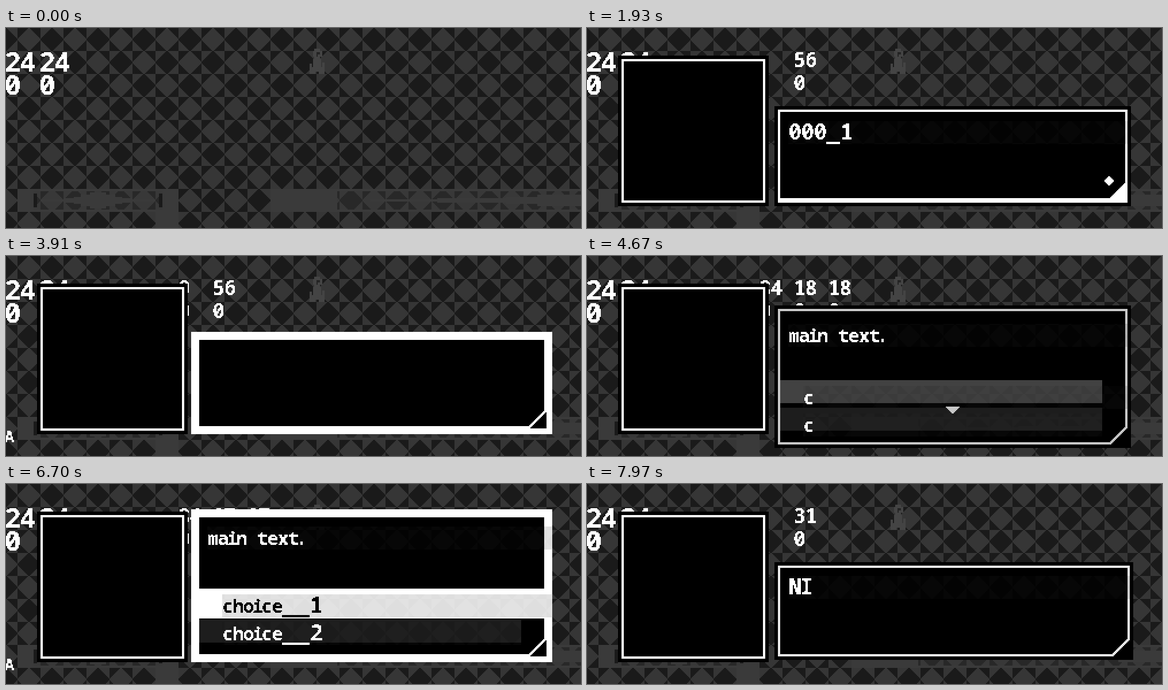
These frames come from a looping animation (1000 px wide and 348 px high, 7990 ms). An HTML page with a canvas:

```html
<!DOCTYPE html>
<html lang="en">
<head>
<meta charset="utf-8">
<title>Message window</title>
<style>
html, body { margin: 0; width: 100%; height: 100%; overflow: hidden; background: #1a1a1a; }
canvas { display: block; width: 1000px; height: 348px; image-rendering: pixelated; }
</style>
</head>
<body>
<canvas id="stage" width="500" height="174"></canvas>
<script>
// Everything is drawn on a half-size grid, shown at twice its size.
const W = 500, H = 174, LOOP = 7990, CHAR_MS = 60;
const ctx = document.getElementById('stage').getContext('2d');

const clamp = v => Math.max(0, Math.min(1, v));
const ramp = (t, from, length) => clamp((t - from) / length);
const easeOut = x => 1 - Math.pow(1 - x, 3);
const gray = v => { const n = Math.round(v * 255); return `rgb(${n},${n},${n})`; };

function layer(w, h) {
  const c = document.createElement('canvas');
  c.width = w;
  c.height = h;
  return c;
}

function rect(g, color, x0, y0, x1, y1) {
  x0 = Math.round(x0); y0 = Math.round(y0);
  g.fillStyle = color;
  g.fillRect(x0, y0, Math.round(x1) - x0, Math.round(y1) - y0);
}

// Diamond made of whole pixel rows
function diamond(g, color, cx, cy, r) {
  for (let y = -r; y < r; y++) {
    const half = y < 0 ? r + y + 1 : r - y;
    rect(g, color, cx - half, cy + y, cx + half, cy + y + 1);
  }
}

function makeBackdrop() {
  const c = layer(W, H), g = c.getContext('2d');
  const light = '#363636', dark = '#1a1a1a', wall = '#3a3a3a';
  for (let j = 0; j < 9; j++) {
    for (let k = 0; k < 26; k++) {
      const odd = (k + j) % 2;
      rect(g, odd ? dark : light, k * 20 - 10, j * 20, k * 20 + 10, j * 20 + 20);
      diamond(g, odd ? light : dark, k * 20, j * 20 + 10, 10);
    }
  }
  // Walls along the floor
  rect(g, wall, 10, 140, 24, 160);
  rect(g, wall, 24, 140, 136, 142);
  rect(g, wall, 24, 158, 136, 160);
  rect(g, wall, 136, 140, 150, 160);
  rect(g, wall, 130, 160, 150, 174);
  rect(g, wall, 230, 140, 288, 160);
  rect(g, wall, 288, 140, 500, 142);
  rect(g, wall, 288, 158, 500, 160);
  g.globalAlpha = .45;
  rect(g, wall, 24, 142, 136, 158);
  rect(g, wall, 288, 142, 500, 158);
  g.globalAlpha = 1;
  rect(g, dark, 24, 144, 27, 156);
  rect(g, dark, 133, 144, 136, 156);
  for (const [half, tall] of [[50, 1], [30, 2], [21, 3], [15, 5], [7, 7]]) {
    rect(g, wall, 80 - half, 150 - tall, 80 + half, 150 + tall);
  }
  for (const [x, tall] of [[317, 1], [375, 2], [435, 3], [462, 5]]) {
    rect(g, wall, x, 150 - tall, 500, 150 + tall);
  }
  // Faint standing figure
  const body = '#444';
  rect(g, body, 268, 18, 273, 27);
  rect(g, body, 267, 20, 275, 25);
  rect(g, body, 267, 27, 274, 38);
  rect(g, body, 264, 31, 266, 40);
  rect(g, body, 266, 34, 269, 40);
  rect(g, body, 272, 34, 275, 40);
  rect(g, body, 275, 30, 277, 40);
  rect(g, '#242424', 270, 21, 273, 23);
  rect(g, '#242424', 270, 23, 271, 25);
  return c;
}
const backdrop = makeBackdrop();

// Text is set glyph by glyph with hard edges.
const glyphs = {};
function glyph(ch, size, color) {
  const key = ch + size + color;
  if (glyphs[key]) return glyphs[key];
  const c = layer(32, 40), g = c.getContext('2d');
  g.font = `600 ${size}px "Noto Sans Mono", "DejaVu Sans Mono", monospace`;
  g.textAlign = 'center';
  g.fillStyle = color;
  g.fillText(ch, 16, 30);
  const img = g.getImageData(0, 0, 32, 40);
  for (let i = 3; i < img.data.length; i += 4) img.data[i] = img.data[i] > 125 ? 255 : 0;
  g.putImageData(img, 0, 0);
  return glyphs[key] = c;
}

const special = { ' ': 9, '.': 5, i: 7, I: 8, _: 12, N: 12 };
const advance = ch => special[ch] || (/[a-z]/.test(ch) ? 9 : 11);
const measure = s => [...s].reduce((sum, ch) => sum + advance(ch), 0);

function write(s, x, y, color = '#fff') {
  for (const ch of s) {
    const w = advance(ch);
    ctx.drawImage(glyph(ch, /[a-z.]/.test(ch) ? 16 : 19, color), Math.round(x + w / 2) - 16, Math.round(y) - 30);
    x += w;
  }
}

function digits(n, x, y, size = 18, step = 10) {
  [...String(n)].forEach((ch, i) =>
    ctx.drawImage(glyph(ch, size, '#fff'), x + i * step + Math.floor(step / 2) - 16, y - 30));
}

const pages = [
  { start: 330, first: 470, slot: 0, text: '000_0', settle: 1050, mark: 1130 },
  { start: 1200, first: 1400, slot: 1, text: '000_1', settle: 1800, mark: 1930 },
  { start: 2010, first: 2210, slot: 0, text: '000_2', settle: 2690, mark: 2820 },
  { start: 2890, first: 3090, slot: 1, text: '000_3', settle: 3540, mark: 3670 },
  { start: 3860, first: 4060, slot: 0, text: 'main text.' },
  { start: 7590, first: 7910, slot: 1, text: 'NICE' }
];
const choices = ['choice__1', 'choice__2'];
const flashes = [1200, 2010, 2890, 3860, 6700];
const presses = [...flashes, 5750];
const CHOOSE = 4618, CHOICE_TEXT = 4660, PICK = 6700, CLOSED = 7100;

const typed = (s, first, t) =>
  t < first ? 0 : Math.min(s.length, 1 + Math.floor((t - first) / CHAR_MS));
const typedWidth = (s, n) => n ? measure(s.slice(0, n + 1)) : 0;

function counter(slot, n) {
  digits(n, 150 + slot * 30, 34);
  digits(0, 150 + slot * 30, 54);
}

function drawCounters(t, index) {
  for (const x of [0, 30]) {
    digits(24, x, 38, 24, 13);
    digits(0, x, 58, 24, 13);
  }
  if (index < 0) return;
  const page = pages[index], prev = pages[index - 1];
  counter(page.slot, typedWidth(page.text, typed(page.text, page.first, t)));
  if (prev && t < page.start + 120) counter(prev.slot, measure(prev.text));
  if (t >= CHOOSE && t < PICK + 80) {
    choices.forEach((s, i) => counter(i + 1, typedWidth(s, typed(s, CHOICE_TEXT, t))));
  }
}

function drawFace(t) {
  const y = Math.round(20 * (1 - easeOut(ramp(t, 330, 200))));
  rect(ctx, '#000', 27, 24 + y, 158, 155 + y);
  rect(ctx, '#fff', 30, 27 + y, 155, 152 + y);
  rect(ctx, '#000', 32, 29 + y, 153, 150 + y);
}

// Text strip: the backdrop shows through a little
function strip(x, y, right) {
  x = Math.round(x); y = Math.round(y);
  const w = Math.round(right) - x;
  ctx.globalAlpha = .14;
  ctx.drawImage(backdrop, x, y, w, 20, x, y, w, 20);
  ctx.globalAlpha = 1;
}

function corner(r, b, color, filled) {
  for (let i = 0; i < 17; i++) {
    const x = r - 1 - i, y = b - 17 + i;
    rect(ctx, filled ? color : '#000', x, y, r, y + 1);
    rect(ctx, color, x, y, Math.min(x + 3, r), y + 1);
  }
}

function drawChoices(t, box, grow, lag, flash) {
  const lit = t >= 6430;
  choices.forEach((s, i) => {
    const y = box.b - 56 + i * 24;
    if (i) rect(ctx, '#1d1d1d', 168, y, 448, y + 20);
    else if (flash) rect(ctx, '#fff', box.l - flash, y - 3, box.r + flash, y + 23);
    else if (lit) rect(ctx, gray(t < 6450 ? .65 : 1), 168, y - 1, 448, y + 21);
    else rect(ctx, gray(.29 * grow), 168, y, 448, y + 20);
    const n = typed(s, CHOICE_TEXT, t), ty = y + 2 + lag * .75;
    if (!n) return;
    strip(188, ty, i ? 448 : box.r + flash);
    write(s.slice(0, n), 188, ty + 16, !i && (lit || flash) ? '#000' : '#fff');
  });
  if (t < 5220) {
    for (let i = 0; i < 6; i++) {
      rect(ctx, '#c8c8c8', 312 + i, box.b - 33 + i, 324 - i, box.b - 32 + i);
    }
  }
  if (t >= 6230 && t < 6430) diamond(ctx, '#fff', 453, Math.round(box.b) - 46, 4);
}

function drawMessage(t, page) {
  if (t >= CLOSED && t < 7590) return;
  const last = page === pages[5], choosing = page === pages[4] && t >= CHOOSE;
  const age = t - (last ? 7590 : 330);
  const [tau, speed] = last ? [75, Math.PI / 380] : [45, 0];

  const grow = choosing ? easeOut(ramp(t, CHOOSE, 100)) : 0;
  const rise = choosing ? easeOut(ramp(t, CHOOSE, 600)) : 0;
  const lag = 5 * (1 - rise) * grow;
  const shut = page === pages[4] ? easeOut(ramp(t, PICK + 200, 200)) : 0;
  const mid = 110.5 - 22 * rise;
  const half = (79 + 44 * grow) / 2 * easeOut(ramp(age, 0, 140)) * (1 - shut);
  if (half < 2) return;

  const box = {
    l: 166,
    r: Math.round(470 - 304 * Math.exp(-age / tau) * Math.cos(speed * age)),
    t: Math.round(mid - half),
    b: Math.round(mid + half)
  };
  if (box.r < box.l + 20) box.r = box.l + 20;

  const hit = flashes.find(f => t >= f && t < f + 400);
  const flash = hit === undefined ? 0 : Math.floor(5.45 * (1 - Math.pow((t - hit) / 400, 2)));
  const done = page.settle ? Math.round(2 * ramp(t, page.settle - 60, 60)) : 0;
  let level = Math.min(1, .76 + age * .00042);
  if (choosing) level = .79 + .21 * ramp(t, 5750, 320);
  const color = flash || done ? '#fff' : gray(level);

  rect(ctx, '#000', box.l - 3, box.t - 3, box.r + 3, box.b + 3 + done);
  rect(ctx, color, box.l - flash, box.t - flash, box.r + flash, box.b + flash + done);
  rect(ctx, '#000', box.l + 2, box.t + 2, box.r - 2, box.b - 2);
  if (half > 12) corner(box.r, box.b, color, done > 0);

  if (t >= PICK + 80 && !last) {
    return;
  }
  const n = typed(page.text, page.first, t);
  if (n) {
    const y = box.t + (last ? 9 : 10) + lag;
    strip(175, y, box.r + flash);
    write(page.text.slice(0, n), 175, y + 16);
  }
  if (choosing) drawChoices(t, box, grow, lag, flash);
  if (page.mark && t >= page.mark) diamond(ctx, '#fff', 454, 133, 4);
}

function draw(t) {
  ctx.drawImage(backdrop, 0, 0);
  let index = -1;
  pages.forEach((p, i) => { if (t >= p.start) index = i; });
  drawCounters(t, index);
  if (index >= 0) {
    drawFace(t);
    drawMessage(t, pages[index]);
  }
  if (presses.some(p => t >= p && t < p + 120)) {
    ctx.drawImage(glyph('A', 14, '#fff'), 3 - 16, 162 - 30);
  }
}

const begin = performance.now();
function tick() {
  const t = (performance.now() - begin) % LOOP;
  draw(Math.floor(t / 10) * 10);
  requestAnimationFrame(tick);
}
tick();
</script>
</body>
</html>
```
